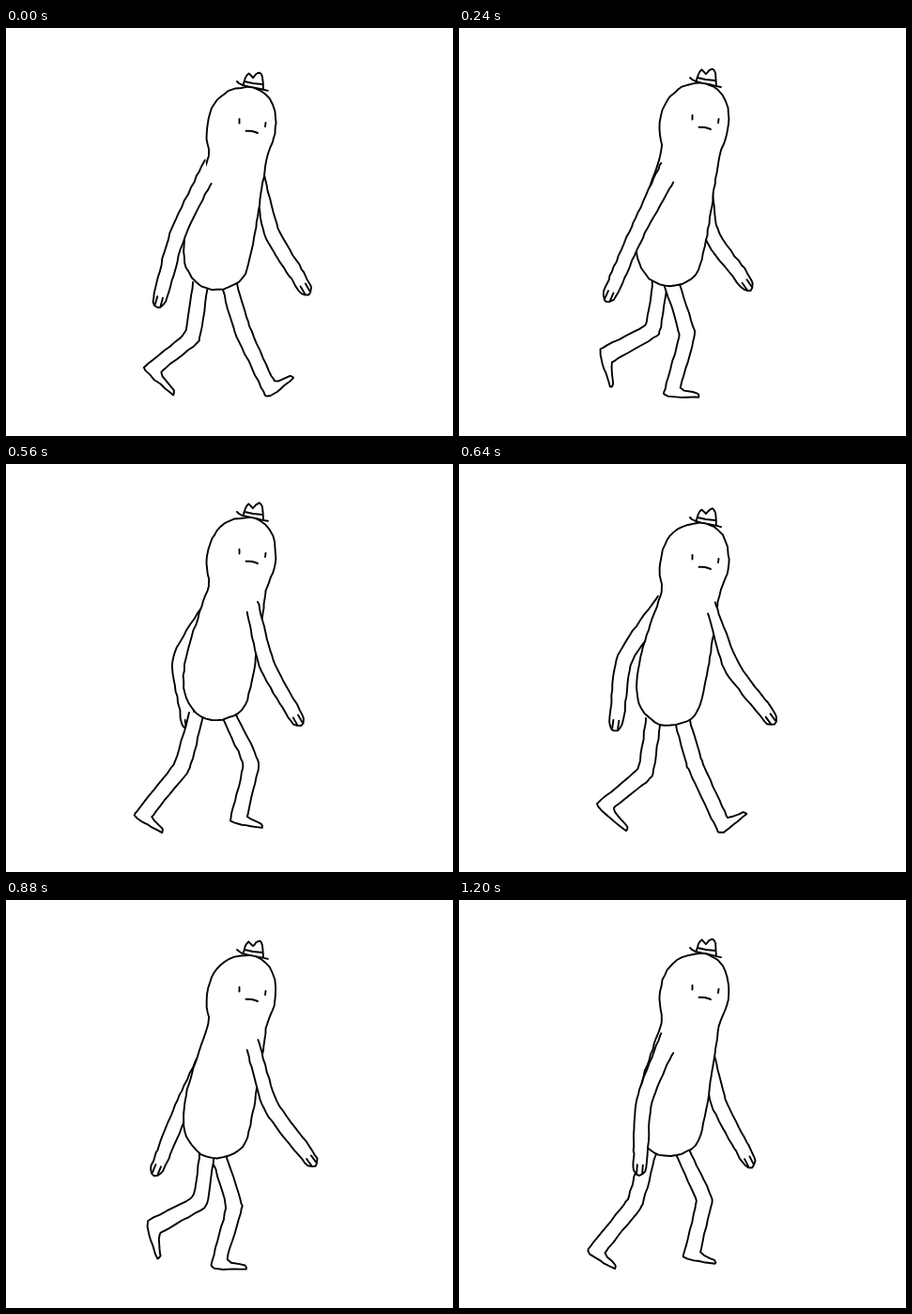
An HTML page with a canvas that plays this animation: 476x435 px, repeating every 1.28 s.

```html
<!DOCTYPE html>
<html lang="en">
<head>
<meta charset="utf-8">
<title>Walking fellow</title>
<style>
  html, body { margin: 0; width: 100%; height: 100%; overflow: hidden; background: #fff; }
  canvas { display: block; }
</style>
</head>
<body>
<canvas id="stage" width="476" height="435"></canvas>
<script>
const STEP = 80, COUNT = 16, LINE = 1.9;
const ctx = document.getElementById('stage').getContext('2d');

// Height of the body at each step of half a walk cycle
const bob = [0, 8, 14, -4, -21, -16, -11, -6];

// Body outline, from the crown round the left side and back
const body = [262,62.5, 250,63.5, 237,67, 225,77, 217,91, 213.5,111, 214.5,124, 215.5,136,
  204,171, 193,206, 189,238, 194,260, 208,275, 225,279, 243,274, 255,262, 263,230,
  269,194, 275,155, 277,141, 282,127, 286.5,112, 287,96, 284,82, 276,70, 262,62.5];
const crown = [252.5,61, 255,53, 258.5,48.5, 263,53, 266,49.5, 270,47.5, 273,52, 274,65];

// Key steps of a leg: hip x, then knee, heel and toe
const legKeys = {
  0: [237, 251,320, 277,393, 306,373],
  2: [232, 265,329, 248,392, 285,392],
  5: [207, 188,318, 156,386, 191,392],
  7: [203, 187,323, 137,374, 166,393],
  8: [207, 198,329, 147,362, 178,391],
  10: [203, 185,327, 136,350, 149,389],
  13: [241, 258,310, 195,335, 207,371],
  15: [236, 261,320, 239,380, 273,388]
};

// Key steps of an arm: hand, then how far the elbow bends back
const nearKeys = {
  0: [161,298, 7], 2: [123,290, 2], 5: [255,296, 4], 7: [314,279, 9],
  10: [355,280, 13], 13: [247,292, 10], 15: [192,294, 11]
};
const farKeys = {
  0: [322,284, 11], 2: [345,272, 9], 5: [221,298, 36], 7: [195,284, 24],
  10: [125,291, 5], 13: [264,297, 4], 15: [312,285, 9]
};

const pairs = (list, dy = 0) =>
  list.flatMap((v, i) => i % 2 ? [] : [[v, list[i + 1] + dy]]);
const unit = (a, b) => {
  const x = b[0] - a[0], y = b[1] - a[1], len = Math.hypot(x, y) || 1;
  return [x / len, y / len];
};
const left = ([x, y]) => [-y, x];
const move = (p, dir, by) => [p[0] + dir[0] * by, p[1] + dir[1] * by];
const mid = (a, b) => [(a[0] + b[0]) / 2, (a[1] + b[1]) / 2];

// Smooth step from p0 to p1 with end slopes m0 and m1
function hermite(p0, p1, m0, m1, u) {
  const v = 1 - u;
  return p0 * (1 + 2 * u) * v * v + m0 * u * v * v + p1 * u * u * (3 - 2 * u) - m1 * u * u * v;
}

let seed = 1;
function rand() {
  seed = (seed * 16807) % 2147483647;
  return seed / 2147483647 - 0.5;
}

// Values of a cyclic key table at a step
function pose(keys, step) {
  step %= COUNT;
  const times = Object.keys(keys).map(Number), n = times.length;
  let k = n - 1;
  while (times[k] > step) k--;
  const [a, b, c, d] = [k - 1, k, k + 1, k + 2].map(j => {
    const turn = Math.floor(j / n), time = times[j - turn * n];
    return { t: time + turn * COUNT, v: keys[time] };
  });
  const h = c.t - b.t;
  return b.v.map((v, i) => hermite(v, c.v[i],
    (c.v[i] - a.v[i]) / (c.t - a.t) * h, (d.v[i] - v) / (d.t - b.t) * h, (step - b.t) / h));
}

// Curve through the points, drawn by a slightly shaky hand
function sketch(pts, round = 1, shake = 1) {
  const out = [pts[0]], last = pts.length - 1;
  for (let i = 0; i < last; i++) {
    const a = pts[Math.max(i - 1, 0)], b = pts[i], c = pts[i + 1], d = pts[Math.min(i + 2, last)];
    const n = Math.max(2, Math.round(Math.hypot(c[0] - b[0], c[1] - b[1]) / 6));
    for (let j = 1; j <= n; j++)
      out.push([0, 1].map(k => rand() * shake +
        hermite(b[k], c[k], (c[k] - a[k]) / 2 * round, (d[k] - b[k]) / 2 * round, j / n)));
  }
  return out;
}

function ink(pts, filled) {
  ctx.beginPath();
  pts.forEach(p => ctx.lineTo(p[0], p[1]));
  if (filled) ctx.fill();
  ctx.stroke();
}

function drawArm(keys, step, phase) {
  const [x, y, bend] = pose(keys, step), hand = [x, y];

  // The shoulder slides across the chest and turns with the swing
  const back = Math.cos((step + phase - 1) * Math.PI / 8);
  const shoulder = [242 - 29 * back, 166 - 15 * back * back + bob[step % 8]];
  const turn = (8 + 72 * back) * Math.PI / 180;
  const slant = [Math.cos(turn), Math.sin(turn)], half = 10 + 3 * back;

  const side = left(unit(shoulder, hand));
  const elbow = move([0, 1].map(k => shoulder[k] * 0.55 + hand[k] * 0.45), side, bend);
  const fwd = unit(elbow, hand), out = left(fwd);
  const wrist = move(hand, fwd, -23), knuckle = move(hand, fwd, -5);
  const tips = [move(knuckle, out, 6), hand, move(knuckle, out, -6)];

  ink(sketch([
    move(shoulder, slant, -half), move(elbow, side, 8), move(wrist, out, 7.5), ...tips,
    move(wrist, out, -7.5), move(elbow, side, -8), move(shoulder, slant, half)
  ], 0.8), true);
  for (const tip of [mid(tips[0], hand), mid(hand, tips[2])]) ink([tip, move(tip, fwd, -9)]);
}

function drawLeg(step) {
  const [hipX, ...rest] = pose(legKeys, step);
  const [knee, heel, toe] = pairs(rest);
  const hip = [hipX, 271 + bob[step % 8]];
  const sole = unit(heel, toe), up = [sole[1], -sole[0]];
  const instep = move(move(heel, sole, 16.5), up, 8.5);
  const side = left(unit(hip, mid(heel, instep)));
  ink(sketch([
    [hip[0] - 8, hip[1]], move(knee, side, 8.5), heel, move(mid(heel, toe), up, -1.5), toe,
    move(move(toe, up, 4), sole, -2), instep, move(knee, side, -8.5), [hip[0] + 8, hip[1]]
  ], 0.3), true);
}

function drawBody(step) {
  const dy = bob[step % 8];
  ink(sketch(pairs(body, dy)), true);
  ink(sketch(pairs(crown, dy), 0.7, 0.4), true);
  ink(sketch(pairs([246,57, 252,61, 266,64, 279,67], dy), 1, 0.4));
  ink(pairs([254,57, 263,59, 273,60], dy));
  ink(pairs([248.5,97, 248.5,101.5], dy));
  ink(pairs([276.5,101, 276,105], dy));
  ink(sketch(pairs([255.5,109.8, 262,110, 268,112], dy), 1, 0));
}

function draw(step) {
  seed = 7919 * (step + 1);
  ctx.fillStyle = '#fff';
  ctx.fillRect(0, 0, 476, 435);
  ctx.strokeStyle = '#000';
  ctx.lineWidth = LINE;
  ctx.lineCap = ctx.lineJoin = 'round';
  drawArm(farKeys, step, 8);
  drawLeg(step + 8);
  drawLeg(step);
  drawBody(step);
  drawArm(nearKeys, step, 0);
}

let shown = -1;
function tick() {
  const step = Math.floor(performance.now() / STEP) % COUNT;
  if (step !== shown) draw(shown = step);
  requestAnimationFrame(tick);
}
tick();
</script>
</body>
</html>
```
